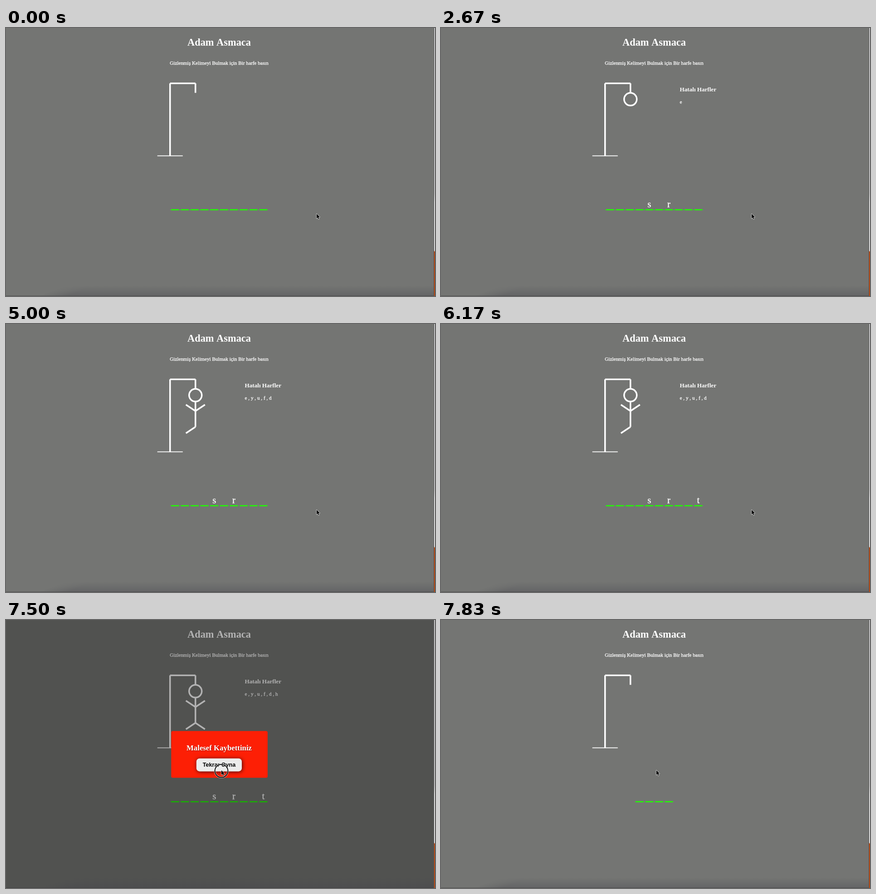
These frames come from a looping animation (946 by 592 pixels, 8000 ms). An HTML page with a canvas:

```html
<!DOCTYPE html>
<html lang="tr">
<head>
<meta charset="utf-8">
<title>Adam Asmaca</title>
<style>
html, body { margin: 0; width: 100%; height: 100%; overflow: hidden; background: #747573; }
canvas { display: block; }
</style>
</head>
<body>
<canvas id="stage" width="946" height="592"></canvas>
<script>
const W = 946, H = 592, LOOP = 8000, STEP = 1000 / 6;
const ctx = document.getElementById('stage').getContext('2d');
const SERIF = '"Liberation Serif", "Times New Roman", serif';
const SANS = '"Liberation Sans", Arial, sans-serif';

// Page zoom and the top left corner of the drawing
const Z = 0.7, OX = 319.75, OY = 108.3;

const HITS = [[495, 's', 4], [1160, 'r', 6], [5160, 't', 9]];
const MISSES = [[1825, 'e'], [2995, 'y'], [3325, 'u'], [3660, 'f'], [3995, 'd'], [6325, 'h']];
const LOST = 6325, CLICK = 7495, RESET = 7660;

// A hairline stroke gives small light text its smoothed weight
function text(str, x, y, size, { color = '#fff', align = 'center', bold = false, family = SERIF } = {}) {
  ctx.font = `${bold ? 'bold ' : ''}${size}px ${family}`;
  ctx.textAlign = align;
  ctx.fillStyle = ctx.strokeStyle = color;
  ctx.lineWidth = 0.3;
  ctx.fillText(str, x, y);
  if (!bold) ctx.strokeText(str, x, y);
}

function roundBox(x, y, w, h, r, color) {
  ctx.fillStyle = color;
  ctx.beginPath();
  ctx.roundRect(x, y, w, h, r);
  ctx.fill();
}

function line(x1, y1, x2, y2) {
  ctx.beginPath();
  ctx.moveTo(x1, y1);
  ctx.lineTo(x2, y2);
  ctx.stroke();
}

const BODY = [
  () => { ctx.beginPath(); ctx.arc(140, 70, 20, 0, 7); ctx.stroke(); },
  () => line(140, 90, 140, 170),
  () => line(140, 120, 110, 100),
  () => line(140, 120, 170, 100),
  () => line(140, 170, 110, 190),
  () => line(140, 170, 170, 190)
];

function drawFigure(parts) {
  ctx.save();
  ctx.translate(OX, OY);
  ctx.scale(Z, Z);
  ctx.beginPath();
  ctx.rect(0, 0, 200, 250);
  ctx.clip();
  ctx.strokeStyle = '#fff';
  ctx.lineWidth = 5;
  line(60, 20, 140, 20);
  line(140, 20, 140, 50);
  line(60, 20, 60, 250);
  line(20, 250, 100, 250);
  BODY.slice(0, parts).forEach(draw => draw());
  ctx.restore();
}

function drawWord(length, hits) {
  const pitch = 21.65, width = 18;
  const left = 470.1 - ((length - 1) * pitch + width) / 2;
  ctx.fillStyle = '#1fff00';
  for (let i = 0; i < length; i++) ctx.fillRect(left + i * pitch, 400.2, width, 2.5);
  for (const [, ch, i] of hits) text(ch, left + i * pitch + width / 2, 395.5, 21);
}

function drawPopup() {
  ctx.fillStyle = 'rgba(0,0,0,.3)';
  ctx.fillRect(0, 0, W, H);
  roundBox(364.3, 245.2, 212.6, 103.2, 3.5, '#fd1f05');
  ctx.save();
  ctx.shadowColor = 'rgba(0,0,0,.35)';
  ctx.shadowBlur = 2;
  ctx.shadowOffsetX = ctx.shadowOffsetY = 1;
  text('Malesef Kaybettiniz', 470, 287.8, 16.8, { bold: true });
  ctx.shadowColor = 'rgba(0,0,0,.75)';
  ctx.shadowBlur = 8;
  roundBox(419.8, 305.8, 100.2, 28.6, 7, '#ececec');
  ctx.restore();
  text('Tekrar Oyna', 470, 324.3, 12.6, { color: '#000', bold: true, family: SANS });
}

// Dock shadow below and the desktop showing past the window's right edge
function drawEdges() {
  for (let y = 568; y < H; y++) {
    const k = (y - 568) / 24;
    const g = ctx.createLinearGradient(130 - 60 * k, 0, 195 - 60 * k, 0);
    g.addColorStop(0, 'rgba(70,70,78,0)');
    g.addColorStop(1, `rgba(70,70,78,${0.36 * k})`);
    ctx.fillStyle = g;
    ctx.fillRect(0, y, W, 1);
  }
  ctx.fillStyle = 'rgba(50,50,50,.5)';
  ctx.fillRect(0, 591, W, 1);
  ctx.fillStyle = '#555';
  ctx.fillRect(943, 0, 1, H);
  const g = ctx.createLinearGradient(0, 0, 0, 494);
  g.addColorStop(0, '#c4c4c4');
  g.addColorStop(0.74, '#c4c4c4');
  g.addColorStop(0.78, '#dedede');
  g.addColorStop(1, '#dedede');
  ctx.fillStyle = '#b84a14';
  ctx.fillRect(944, 488, 2, H - 488);
  ctx.fillStyle = g;
  ctx.beginPath();
  ctx.roundRect(944, -4, 6, 498, [0, 0, 4, 4]);
  ctx.fill();
}

function drawCursor(x, y, pressed) {
  if (pressed) {
    ctx.beginPath();
    ctx.arc(x, y + 1.3, 14.4, 0, 7);
    ctx.strokeStyle = 'rgba(255,255,255,.75)';
    ctx.lineWidth = 3.6;
    ctx.stroke();
    ctx.strokeStyle = '#0a0a0a';
    ctx.lineWidth = 2;
    ctx.stroke();
  }
  ctx.save();
  ctx.translate(x, y);
  ctx.beginPath();
  [[0, 0], [0, 10.2], [2.3, 8.1], [4, 12], [5.6, 11.3], [4, 7.4], [7, 7.3]]
    .forEach(p => ctx.lineTo(...p));
  ctx.closePath();
  ctx.lineJoin = 'round';
  ctx.strokeStyle = 'rgba(255,255,255,.8)';
  ctx.lineWidth = 1.4;
  ctx.stroke();
  ctx.fillStyle = '#000';
  ctx.fill();
  ctx.restore();
}

// Pointer glides to the button, moving in steps like a screen recording
function cursorAt(t) {
  const held = Math.floor((t + 8) / STEP) * STEP;
  const p = Math.min(1, Math.max(0, (held - 6500) / 830));
  const e = p * p * (3 - 2 * p);
  return [685 - 210 * e, 410.5 - 78.5 * e];
}

function render(t) {
  const over = t >= RESET;
  const before = list => over ? [] : list.filter(([at]) => t >= at);
  const misses = before(MISSES);

  ctx.fillStyle = '#747573';
  ctx.fillRect(0, 0, W, H);
  text('Adam Asmaca', 470, 38.6, 22.4, { bold: true });
  text('Gizlenmiş Kelimeyi Bulmak için Bir harfe basın', 470, 80.5, 11.2);
  drawFigure(misses.length);
  if (misses.length) {
    text('Hatalı Harfler', 526.6, 140.4, 13.1, { align: 'left', bold: true });
    text(misses.map(m => m[1]).join(' , '), 526.6, 166.6, 11.2, { align: 'left' });
  }
  drawWord(over ? 4 : 10, before(HITS));
  if (t >= LOST && !over) drawPopup();
  drawEdges();
  drawCursor(...cursorAt(t), t >= CLICK && !over);
}

const start = performance.now();
function tick() {
  render((performance.now() - start) % LOOP);
  requestAnimationFrame(tick);
}
tick();
</script>
</body>
</html>
```
